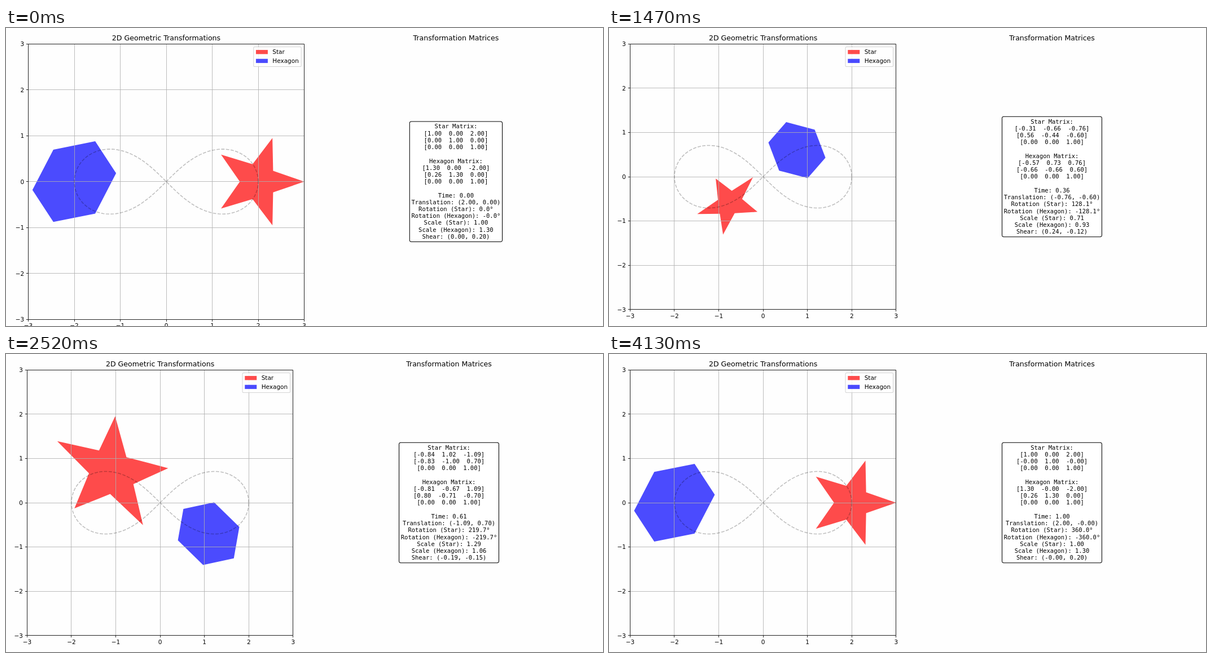
These frames come from a looping animation (1058x529 px, 4.2 s). An HTML page:

```html
<!DOCTYPE html>
<html lang="en">
<head>
<meta charset="utf-8">
<title>2D Geometric Transformations</title>
<style>
  html, body { margin: 0; width: 100%; height: 100%; overflow: hidden; background: #fefefe; }
  svg { display: block; width: 1058px; height: 529px; }
  text { font: 10.496px "DejaVu Sans", sans-serif; fill: #000; white-space: pre; }
  .title { font-size: 12.595px; }
  .mono { font-family: "DejaVu Sans Mono", monospace; }
  .mid { text-anchor: middle; }
  .end { text-anchor: end; }
  .line { fill: none; stroke: #000; stroke-width: .84; }
  .grid { stroke: #b0b0b0; }
</style>
</head>
<body>
<svg id="stage" viewBox="0 0 1058 529"></svg>
<script>
const STEP = 70, COUNT = 60, EM = 10.496, TAU = 2 * Math.PI;
const RED = 'fill="#f00" fill-opacity=".7"', BLUE = 'fill="#00f" fill-opacity=".7"';
const TICKS = [-3, -2, -1, 0, 1, 2, 3];
const stage = document.getElementById('stage');

// The first picture is laid out before the margins settle.
const FIRST = { x: 284, y: 272.7, unit: 81.5, panel: 797.4 };
const SETTLED = { x: 273.1, y: 264, unit: 78.57, panel: 785 };

const snap = v => Math.floor(v) + 0.5;
const text = (x, y, cls, s) => `<text x="${x}" y="${y}" class="${cls}">${s}</text>`;
const path = (cls, d) => `<path class="line ${cls}" d="${d}"/>`;

const lemniscate = a => {
  const s = Math.sin(a), c = Math.cos(a), k = 2 / (1 + s * s);
  return [k * c, k * s * c];
};
const ring = (n, radius) => Array.from({ length: n }, (_, i) => {
  const a = TAU * i / n, r = radius(i);
  return [r * Math.cos(a), r * Math.sin(a)];
});
const STAR = ring(10, i => i % 2 ? 0.4 : 1);
const HEXAGON = ring(6, () => 0.7);
const TRACK = Array.from({ length: 201 }, (_, i) => lemniscate(TAU * i / 200));

// Translation * shear * rotation * uniform scale, as the top two rows.
function matrix(angle, scale, shearX, shearY, tx, ty) {
  const c = scale * Math.cos(angle), s = scale * Math.sin(angle);
  return [[c + shearX * s, -s + shearX * c, tx], [s + shearY * c, c - shearY * s, ty]];
}
const apply = (m, points) => points.map(([x, y]) => m.map(([a, b, t]) => a * x + b * y + t));
const rows = m => [...m, [0, 0, 1]].map(r => `[${r.map(v => v.toFixed(2)).join('  ')}]`);

function axes(L, shapes) {
  const px = x => L.x + x * L.unit, py = y => L.y - y * L.unit;
  const points = list => list.map(([x, y]) => px(x).toFixed(2) + ',' + py(y).toFixed(2)).join(' ');
  const left = snap(px(-3)), right = snap(px(3)), top = snap(py(3)), bottom = snap(py(-3));
  const size = 6 * L.unit;
  let grid = '', ticks = '', labels = '';
  for (const v of TICKS) {
    const x = snap(px(v)), y = snap(py(v)), label = String(v).replace('-', '\u2212');
    grid += `M${x} ${top}V${bottom}M${left} ${y}H${right}`;
    ticks += `M${x} ${bottom}v3.67M${left} ${y}h-3.67`;
    labels += text(px(v), py(-3) + 15.1, 'mid', label) + text(px(-3) - 7.35, py(v) + 3.9, 'end', label);
  }
  return `<clipPath id="frame"><rect x="${px(-3)}" y="${py(3)}" width="${size}" height="${size}"/></clipPath>
    <g clip-path="url(#frame)">
      <polygon points="${points(apply(shapes.star, STAR))}" ${RED}/>
      <polygon points="${points(apply(shapes.hexagon, HEXAGON))}" ${BLUE}/>
      ${path('grid', grid)}
      <polyline points="${points(TRACK)}" fill="none" stroke="#000" stroke-opacity=".25"
        stroke-width="1.57" stroke-dasharray="5.82 2.52"/>
    </g>`
    + path('', ticks + `M${left} ${top}H${right}V${bottom}H${left}Z`) + labels
    + text(L.x, 22, 'title mid', '2D Geometric Transformations')
    + legend(px(3) - 0.5 * EM);
}

function legend(right) {
  const width = 84.5, x = right - width, handle = x + 0.4 * EM;
  const entry = (y, fill, name) =>
    `<rect x="${handle}" y="${y - 7.35}" width="${2 * EM}" height="7.35" ${fill}/>`
    + text(handle + 2.8 * EM, y, '', name);
  return `<rect x="${x}" y="33.5" width="${width}" height="35" rx="2.1" fill="#fff" stroke="#ccc"
    stroke-width="1.05" opacity=".8"/>` + entry(46.3, RED, 'Star') + entry(62.1, BLUE, 'Hexagon');
}

function panel(L, lines) {
  const width = Math.max(...lines.map(s => s.length)) * 0.602 * EM + 0.6 * EM;
  return text(L.panel, 22, 'title mid', 'Transformation Matrices')
    + `<rect x="${L.panel - width / 2}" y="${L.y - 106.7}" width="${width}" height="213.4" rx="3.15"
      fill="#fff" stroke="#000" stroke-width="1.05"/>`
    + lines.map((s, i) => text(L.panel, L.y - 94.3 + 12.22 * i, 'mono mid', s)).join('');
}

function draw(index) {
  const layout = index ? SETTLED : FIRST;
  const time = index / (COUNT - 1), angle = TAU * time;
  const [x, y] = lemniscate(angle);
  const starScale = 1 + 0.3 * Math.sin(2 * angle), hexScale = 1 + 0.3 * Math.cos(2 * angle);
  const shearX = 0.3 * Math.sin(angle), shearY = 0.2 * Math.cos(angle);
  const star = matrix(angle, starScale, shearX, 0, x, y);
  const hexagon = matrix(-angle, hexScale, 0, shearY, -x, -y);
  const pair = (a, b) => `(${a.toFixed(2)}, ${b.toFixed(2)})`;
  const degrees = (360 * time).toFixed(1) + '°';

  stage.innerHTML = axes(layout, { star, hexagon }) + panel(layout, [
    'Star Matrix:', ...rows(star), '',
    'Hexagon Matrix:', ...rows(hexagon), '',
    'Time: ' + time.toFixed(2),
    'Translation: ' + pair(x, y),
    'Rotation (Star): ' + degrees,
    'Rotation (Hexagon): -' + degrees,
    'Scale (Star): ' + starScale.toFixed(2),
    'Scale (Hexagon): ' + hexScale.toFixed(2),
    'Shear: ' + pair(shearX, shearY)
  ]);
}

let shown = -1;
function tick() {
  const index = Math.floor(performance.now() / STEP) % COUNT;
  if (index !== shown) draw(shown = index);
  requestAnimationFrame(tick);
}
tick();
</script>
</body>
</html>
```
